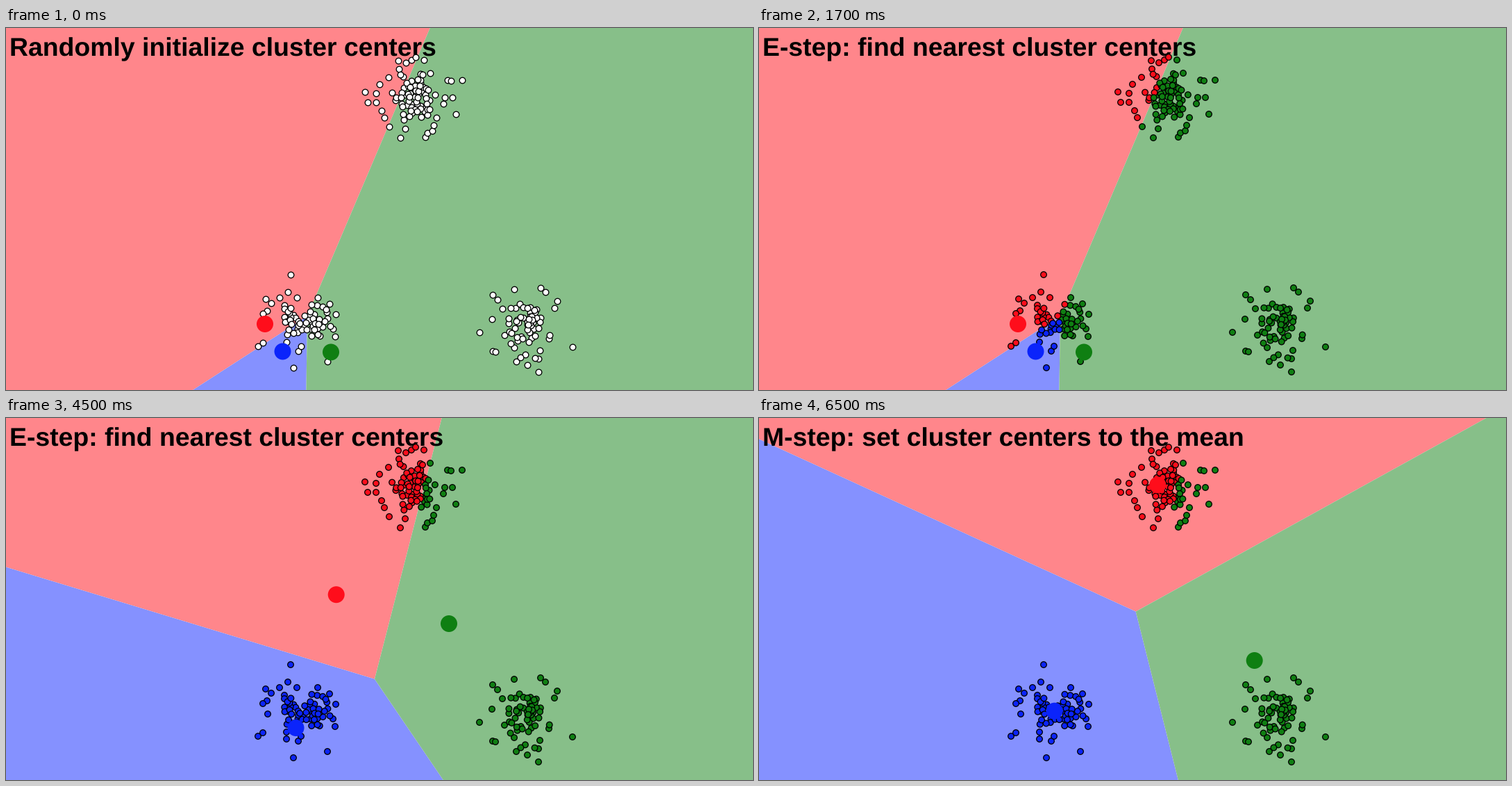
Animation of 1076 by 521 pixels, one loop 8000 ms. Source, as a matplotlib script:

```python
import numpy as np
import matplotlib
import matplotlib.pyplot as plt
from matplotlib.animation import FuncAnimation

matplotlib.rcParams["text.hinting"] = "none"

W, H, DPI = 1076, 521, 100
PT = 72 / DPI  # points per pixel

FILLS = ["#ff0d1b", "#0b24fb", "#0f7f12"]
AREAS = ["#ff868b", "#8591ff", "#87bf89"]

# Cluster centers (red, blue, green) after each update
CENTERS = np.array([
    [(373, 426), (398.5, 465.5), (468, 466.5)],
    [(475.7, 254.2), (417.5, 446), (638, 296)],
    [(574.3, 96.3), (425.5, 421.7), (713.7, 349)],
])

# (start ms, title, centers in use, centers the dots were assigned to)
STEPS = [
    (0, "Randomly initialize cluster centers", 0, None),
    (500, "E-step: find nearest cluster centers", 0, 0),
    (2500, "M-step: set cluster centers to the mean", 1, 0),
    (4500, "E-step: find nearest cluster centers", 1, 1),
    (6500, "M-step: set cluster centers to the mean", 2, 1),
]

# Outlying dots of each cluster; the dense middles are sampled
TOP_RIM = [
    (565, 47), (576, 50), (584, 46), (590, 42), (602, 46), (566, 59),
    (551, 71), (538, 81), (517, 92), (521, 107), (533, 94), (533, 107),
    (541, 119), (545, 129), (552, 142), (568, 158), (604, 157), (607, 151),
    (614, 148), (616, 140), (620, 129), (648, 124), (630, 109), (632, 100),
    (643, 100), (657, 75), (636, 75), (641, 76), (611, 65), (575, 145),
]
LEFT_RIM = [
    (410, 355), (406, 380), (374, 390), (382, 396), (394, 388), (419, 388),
    (401, 399), (376, 407), (370, 411), (377, 426), (363, 458), (370, 453),
    (404, 452), (404, 462), (421, 465), (425, 458), (414, 489), (463, 480),
    (474, 444), (471, 433), (475, 412), (466, 397), (449, 388),
]
RIGHT_RIM = [
    (682, 438), (700, 419), (701, 384), (708, 391), (732, 376), (770, 374),
    (777, 380), (794, 393), (790, 403), (816, 459), (767, 495), (751, 485),
    (767, 476), (701, 465), (705, 466), (782, 447), (769, 464), (715, 404),
    (718, 442), (732, 460), (735, 480),
]


def sample(rng, n, mid, sd, cut=1.75, gap=3.2):
    """Gaussian dots cut to an ellipse and kept slightly apart."""
    dots = []
    while len(dots) < n:
        z = rng.normal(size=2)
        p = np.add(mid, z * sd)
        if np.hypot(*z) < cut and all(np.hypot(*(p - q)) > gap for q in dots):
            dots.append(p)
    return dots


def make_dots():
    rng = np.random.default_rng(12)
    return np.array(
        TOP_RIM + sample(rng, 62, (585, 99), (20, 22))
        + LEFT_RIM + sample(rng, 22, (411, 420), (11, 13))
        + sample(rng, 30, (446, 420), (13, 14))
        + RIGHT_RIM + sample(rng, 34, (746, 420), (17, 18))
        + sample(rng, 16, (752, 440), (20, 23)))


def clip(poly, near, far):
    """Part of a polygon that lies closer to near than to far."""
    normal, mid = far - near, (near + far) / 2
    side = [(p - mid) @ normal for p in poly]
    out = []
    for i, p in enumerate(poly):
        j = (i + 1) % len(poly)
        if side[i] <= 0:
            out.append(p)
        if side[i] * side[j] < 0:
            t = side[i] / (side[i] - side[j])
            out.append(p + t * (poly[j] - p))
    return out


def cell(centers, k):
    poly = [np.array(p, float) for p in [(0, 0), (W, 0), (W, H), (0, H)]]
    for j, other in enumerate(centers):
        if j != k:
            poly = clip(poly, centers[k], other)
    return np.array(poly)


def nearest(dots, centers):
    gaps = np.linalg.norm(dots[:, None] - centers[None], axis=2)
    return gaps.argmin(axis=1)


dots = make_dots()

fig = plt.figure(figsize=(W / DPI, H / DPI), dpi=DPI, facecolor="white")
ax = fig.add_axes([0, 0, 1, 1])
ax.set_xlim(0, W)
ax.set_ylim(H, 0)
ax.axis("off")

areas = [ax.fill([0, 1, 1], [0, 0, 1], color=c, lw=0, zorder=1)[0]
         for c in AREAS]
title = ax.text(5, 40, "", family="Liberation Sans", weight="bold",
                size=37.33 * PT, color="black", va="baseline", zorder=2)
dot_art = ax.scatter(*dots.T, s=(8.6 * PT) ** 2, c="white",
                     edgecolors="black", linewidths=1.3 * PT, zorder=3)
center_art = ax.scatter(*CENTERS[0].T, s=(24 * PT) ** 2, c=FILLS,
                        linewidths=0, zorder=4)

INTERVAL, LOOP = 500, 8000


def draw(i):
    now = i * INTERVAL
    _, words, used, owner = [s for s in STEPS if s[0] <= now][-1]
    centers = CENTERS[used]
    title.set_text(words)
    for k, area in enumerate(areas):
        area.set_xy(cell(centers, k))
    if owner is None:
        dot_art.set_facecolor("white")
    else:
        owners = nearest(dots, CENTERS[owner])
        dot_art.set_facecolor([FILLS[k] for k in owners])
    center_art.set_offsets(centers)
    return [*areas, title, dot_art, center_art]


anim = FuncAnimation(fig, draw, frames=LOOP // INTERVAL, interval=INTERVAL,
                     init_func=lambda: draw(0), repeat=True, repeat_delay=0)
plt.show()
```
